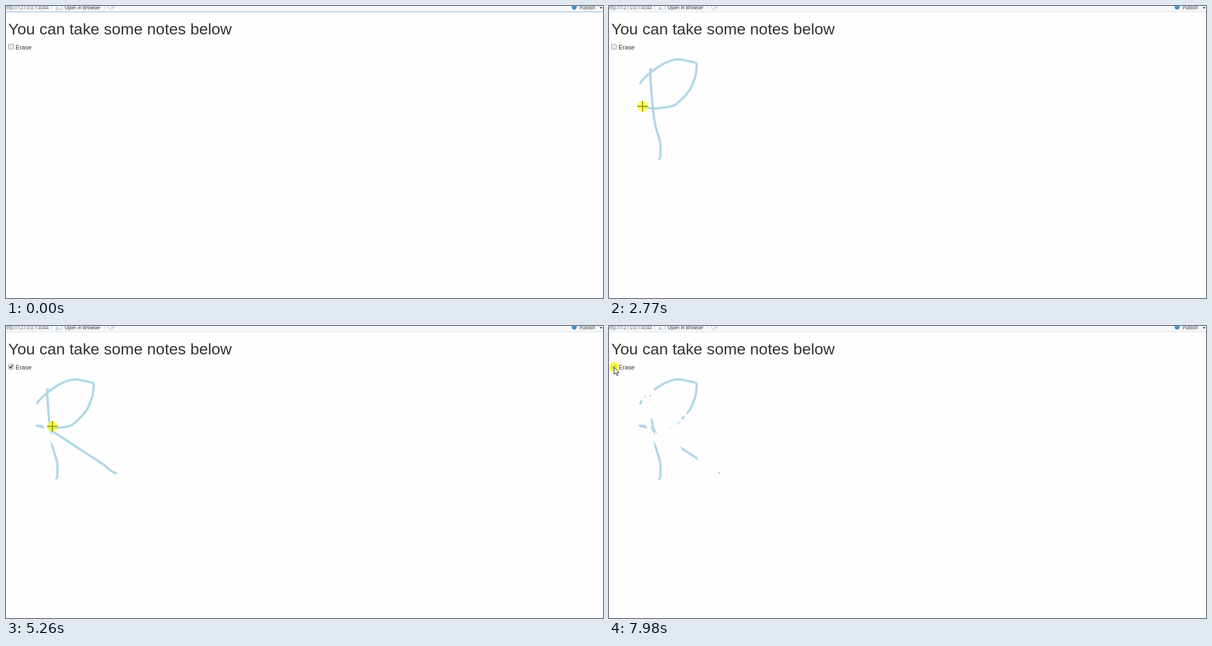
An HTML page that plays this animation: 1068 px wide and 524 px high, repeating every 8000 ms.

```html
<!DOCTYPE html>
<html lang="en">
<head>
<meta charset="utf-8">
<title>Notes</title>
<style>
  html, body { margin: 0; width: 100%; height: 100%; overflow: hidden; background: #fefefe; }
  svg { display: block; width: 100vw; height: 100vh; }
  .bar { font: 8.2px "Open Sans", "Noto Sans", sans-serif; fill: #222; }
  .page { font-family: "Liberation Sans", Arial, sans-serif; fill: #333; }
  .trace path { fill: none; stroke-width: 4; stroke-linecap: round; stroke-linejoin: round; }
  .trace .ink { stroke: #add8e6; }
  .trace .erase { stroke: #fefefe; stroke-width: 6; }
</style>
</head>
<body>
<svg viewBox="0 0 1068 524">
  <rect width="1068" height="524" fill="#fefefe"/>
  <rect width="1068" height="10" fill="#f7f8f9"/>
  <rect id="edge" y="10" width="1068" height="1"/>
  <g class="bar">
    <text x="-3" y="5.6" fill="#555">http://127.0.0.1:4044</text>
    <text x="105" y="5.6">Open in Browser</text>
    <text x="1026" y="5.6">Publish</text>
  </g>
  <path d="M81.5 0V6M176.5 0V6" stroke="#cfd3d8"/>
  <path d="M91.5 0V6H100.5V0M88.5 6.5H94" fill="none" stroke="#b3bfcc"/>
  <circle cx="91" cy="4" r="2.5" fill="#bed3e8"/>
  <path d="M183.2 0A5 5 0 1 0 193 2H188" fill="none" stroke="#c3c8cd" stroke-width="1.3"/>
  <circle cx="1016.5" cy="2" r="4.5" fill="#4291cf"/>
  <path d="M1062 2H1067L1064.5 5Z" fill="#333"/>
  <g class="page">
    <text x="4" y="51" font-size="28.4">You can take some notes below</text>
    <text x="17" y="78" font-size="11.1">Erase</text>
  </g>
  <rect x="4.5" y="68.5" width="9" height="9" rx="1.5" fill="#e9e9e9" stroke="#a6a6a6"/>
  <path id="tick" d="M6.3 73L8.3 75.2L11.8 70.3" fill="none" stroke="#3c3c3c" stroke-width="1.9"/>
  <g id="trace" class="trace"></g>
  <path id="cross" d="M-9.5 0H9.5M0 -9.5V9.5" stroke="#000" stroke-width="2"/>
  <circle id="halo" r="9.8" fill="#ff0" opacity=".6"/>
  <path id="arrow" d="M0 0V12.8L3 10L5.2 15.2L7.2 14.3L5 9.4H9Z" fill="#fff" stroke="#222"/>
</svg>
<script>
const LOOP = 8000;
const $ = id => document.getElementById(id);

// start, end, steps, kind, path; "drag" holds the button without leaving a trace
const moves = [
  [150, 230, 2, 'move', 'M543 442L327 246'],
  [460, 840, 6, 'move', 'M327 251C240 190 63 150 63 113L75 113'],
  [990, 1540, 8, 'ink', 'M75 113Q73 115 74 125C76 160 79 195 83 215C87 232 92 240 92 250V268Q92 273 90 274'],
  [1700, 1930, 4, 'move', 'M90 274C92 220 70 160 57 150'],
  [2010, 2160, 3, 'move', 'M57 150L56 139'],
  [2310, 2770, 7, 'ink', 'M56 139Q56 137 60 133Q67 125 75 119C90 107 106 97 121 96Q127 95.5 133 97L152 101Q158 102 157 108L155 125Q150 140 145 150Q135 164 119 177Q111 182 80 184Q68 183 60 180'],
  [2850, 3080, 4, 'ink', 'M60 180Q52 178 57 179Q66 179 74 183L175 249Q184 257 188 260Q193 263 197 264'],
  [3230, 4010, 11, 'move', 'M197 264C150 150 30 110 10 86L8.5 72.5'],
  [4165, 4165, 1, 'drag', 'M8.5 72.5h.1'],
  [4240, 4240, 1, 'move', 'M8.5 72.5h.1'],
  [4410, 4640, 4, 'move', 'M8.5 72.5C40 110 80 180 114 221'],
  [4790, 5100, 5, 'erase', 'M114 221C100 220 92 218 86 211L67.5 175'],
  [5180, 5260, 2, 'drag', 'M67.5 175Q66 168 83 180'],
  [5340, 5570, 4, 'erase', 'M83 180L89 192L97 196.5L106 204L124 215.5L128 224L148 274L163 241L137 160L128 140L82 120L78 116.5L75 113L74 118L69 124.5L66 141L60 145'],
  [5650, 6110, 7, 'erase', 'M60 145L74 142L76 160L84 172L86 183L103 182L108 190L160 233L165 243L175 249.5L184 257L190 261L246 328'],
  [6190, 6430, 4, 'drag', 'M246 328Q246 300 233 287'],
  [6500, 6730, 4, 'erase', 'M233 287L126 167L119 174Q108 165 90 162'],
  [6800, 6960, 3, 'erase', 'M90 162Q77 148 76 140L75 129L62 134L58 113L74 115L106 179L118 178L157 226'],
  [7210, 7900, 10, 'move', 'M157 226C120 130 40 130 12 92L9 74'],
  [7980, 7980, 1, 'drag', 'M9 74h.1'],
].map(([start, end, steps, kind, d]) => {
  const path = document.createElementNS('http://www.w3.org/2000/svg', 'path');
  path.setAttribute('d', d);
  path.setAttribute('class', kind);
  $('trace').append(path);
  return { start, end, steps, kind, path, length: path.getTotalLength(),
           tick: (end - start) / (steps - 1) || 1 };
});

const show = (el, on) => el.setAttribute('visibility', on ? 'visible' : 'hidden');
const place = (el, p) => el.setAttribute('transform', `translate(${p.x} ${p.y})`);

function travelled(m, t) {
  if (t < m.start) return 0;
  const step = Math.floor((t - m.start) / m.tick + 0.05) + 1;
  return m.length * Math.min(step / m.steps, 1);
}

function draw(t) {
  let current = null;
  for (const m of moves) {
    const run = travelled(m, t);
    if (run) current = m;
    show(m.path, run > 0 && (m.kind === 'ink' || m.kind === 'erase'));
    m.path.setAttribute('stroke-dasharray', `${run} ${m.length + 20}`);
  }
  const at = current ? current.path.getPointAtLength(travelled(current, t)) : { x: -50, y: -50 };
  const pointer = current === moves[0] || at.y < 86;
  for (const el of [$('cross'), $('arrow'), $('halo')]) place(el, at);
  show($('cross'), current && !pointer);
  show($('arrow'), current && pointer);
  show($('halo'), current && current.kind !== 'move');
  show($('tick'), t >= 4240);
  $('edge').setAttribute('fill', t < 990 ? '#86afe0' : '#dde2e8');
}

function frame(now) {
  draw(now % LOOP);
  requestAnimationFrame(frame);
}
draw(0);
requestAnimationFrame(frame);
</script>
</body>
</html>
```
